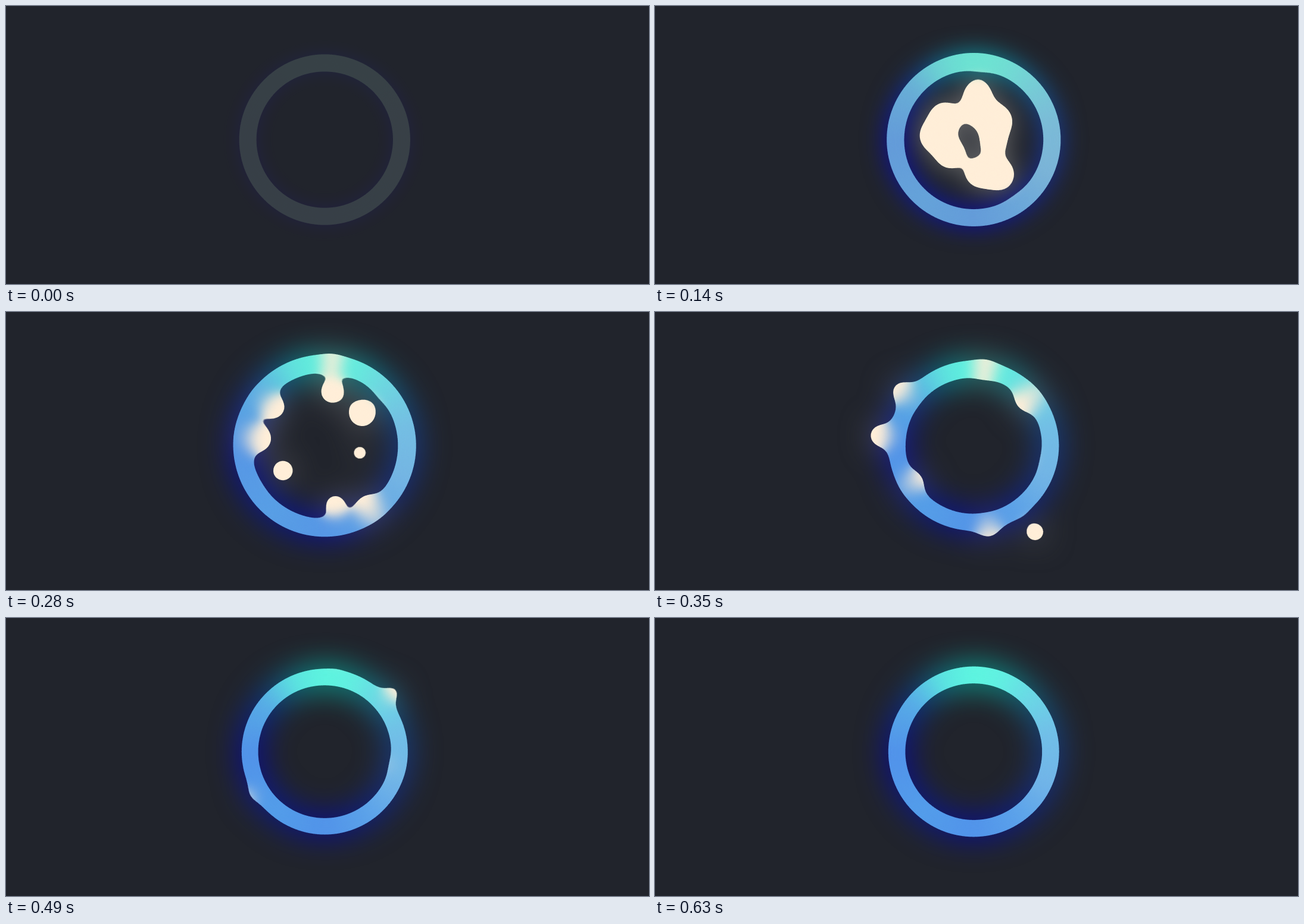
These frames come from a looping animation (1080x468 px, 0.7 s). An HTML page with a canvas:

```html
<!DOCTYPE html>
<html lang="en">
<head>
<meta charset="utf-8">
<title>Gooey ring burst</title>
<style>
  html, body { margin: 0; width: 100%; height: 100%; overflow: hidden; background: #21242c; }
  canvas { display: block; filter: url(#goo); }
  svg { position: absolute; width: 0; height: 0; }
</style>
</head>
<body>
<canvas id="stage" width="1080" height="468"></canvas>
<svg>
  <!-- Blur and sharpen the alpha to merge shapes, then lay a darker glow underneath. -->
  <filter id="goo" x="0" y="0" width="1" height="1" color-interpolation-filters="sRGB">
    <feGaussianBlur stdDeviation="13"/>
    <feColorMatrix result="shape" values="1 0 0 0 0  0 1 0 0 0  0 0 1 0 0  0 0 0 40 -13.5"/>
    <feColorMatrix values=".6 0 0 0 -.2  -.53 2.12 0 0 -1.045  -.45 0 0 0 .86  0 0 0 1 0"/>
    <feGaussianBlur id="glow" stdDeviation="26" result="glow"/>
    <feMerge><feMergeNode in="glow"/><feMergeNode in="shape"/></feMerge>
  </filter>
</svg>
<script>
const canvas = document.getElementById('stage');
const glow = document.getElementById('glow');
const ctx = canvas.getContext('2d');
const STEP = 70, STEPS = 10, PEAK = 4;
const CREAM = '#ffeed8', PALE = 'rgb(152,176,170)';

// Each drop: offset from the centre and radius at the peak step.
const drops = [
  [13, -91, 18.5], [12, -138, 14.5], [63, -55, 21],
  [59, 12, 13.5], [-86, -65, 18], [-111, -12, 20],
  [-70, 42, 16.7], [18, 100, 16], [73, 103, 18.5]
];
// Share of the peak offset that every drop has travelled at each step.
const travel = [0, .3, .56, .79, 1, 1.41, 1.63, 1.83, 2, 2.15];

const hues = ctx.createConicGradient(-Math.PI / 2, 0, 0);
[[0, '#5cf6e0'], [20, '#60f0e1'], [45, '#69d8e5'], [75, '#70bfe8'], [115, '#70b4e8'],
 [145, '#5aa2ea'], [180, '#5093ea'], [220, '#529dea'], [270, '#5092ea'],
 [310, '#56ace6'], [338, '#5ae6e0'], [360, '#5cf6e0']]
  .forEach(([angle, color]) => hues.addColorStop(angle / 360, color));

function smooth(x) {
  const t = Math.min(1, Math.max(0, x));
  return t * t * (3 - 2 * t);
}

// The ring swells up to the peak, then dips below its rest size and recovers.
function ringScale(step) {
  return step <= PEAK
    ? 1 + .07 * smooth((step - 1) / 3)
    : 1 - .027 * Math.sin(Math.PI * (step - 4.9) / 4.1);
}

function circle(x, y, radius) {
  ctx.beginPath();
  ctx.arc(x, y, radius, 0, Math.PI * 2);
}

function drawRing(step) {
  const scale = ringScale(step);
  ctx.lineWidth = 20 * scale;
  circle(0, 0, 129.8 * scale);
  ctx.strokeStyle = hues;
  ctx.stroke();
  ctx.globalAlpha = .9 * .55 ** step;
  ctx.strokeStyle = PALE;
  ctx.stroke();
  ctx.globalAlpha = 1;
}

function drawDrops(step) {
  ctx.fillStyle = CREAM;
  for (const [dx, dy, size] of drops) {
    const radius = (size - 3.2 * (step - PEAK)) * Math.min(1, step / 1.5);
    circle(dx * travel[step], dy * travel[step], Math.max(0, radius));
    ctx.fill();
  }
}

function draw(step) {
  ctx.setTransform(1, 0, 0, 1, 0, 0);
  ctx.clearRect(0, 0, canvas.width, canvas.height);
  ctx.translate(535.3, 225);
  const spread = Math.min(26, 14 + 3 * step);
  glow.setStdDeviation(spread, spread);
  canvas.style.opacity = Math.min(1, .2 + .4 * step);
  drawRing(step);
  drawDrops(step);
}

let shown = -1;
function frame(now) {
  const step = Math.floor(now / STEP) % STEPS;
  if (step !== shown) draw(shown = step);
  requestAnimationFrame(frame);
}
requestAnimationFrame(frame);
</script>
</body>
</html>
```
